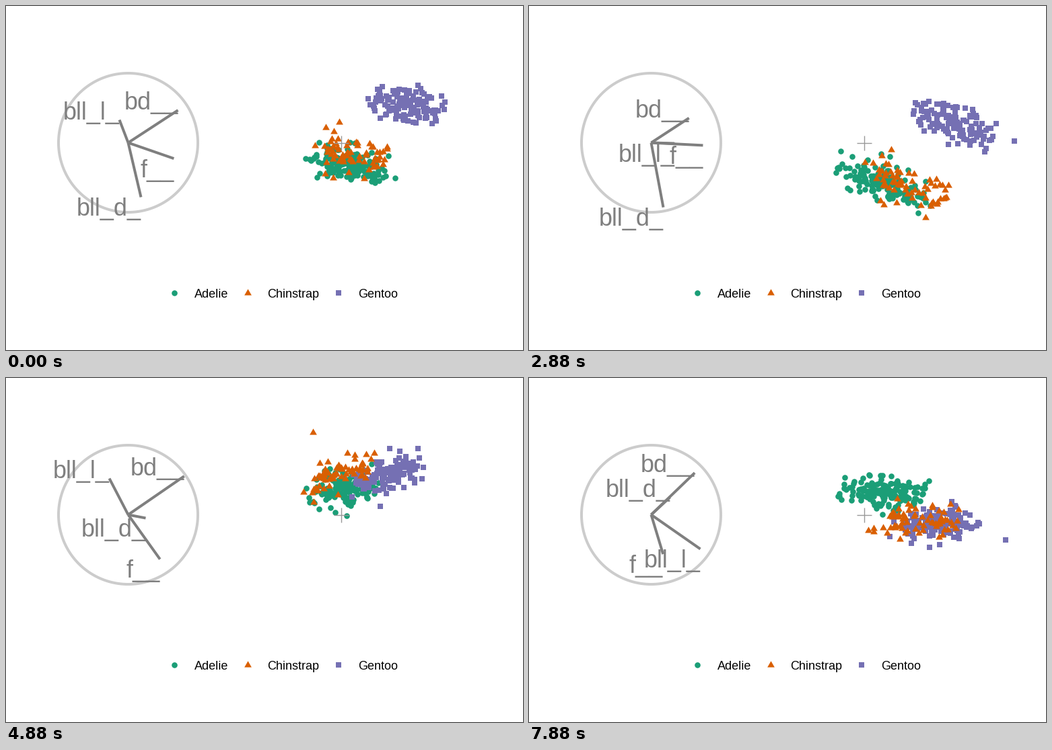
Write a matplotlib script that moves like this. It is 768x512 px and loops after 8000 ms.

```python
import numpy as np
import matplotlib.pyplot as plt
from matplotlib.animation import FuncAnimation

W, H, DPI = 768, 512, 100
PT = 72 / DPI                      # points per pixel
HUB, RADIUS = np.array([181, 203]), 103
ORIGIN, SCALE = np.array([423.5, 174]), 179
GREY, FONT = "#7f7f7f", "Liberation Sans"
FRAMES, INTERVAL = 64, 125

# Path of the tour: frame, tip of bill length, tip of bill depth (pixels from
# the hub), and the turn in degrees of the flipper and mass spokes
PATH = np.array([
    (8, -13, -34, 19, 81, 40),
    (17, 33, 1, 19, 99, 27),
    (22, 38, 5, 17, 99, 26),
    (29, 15, -23, 24, 79, 39),
    (39, -28, -54, 26, 5, 55),
    (47, -16, -22, 7, -33, 58.5),
    (55, 24, 19, 7, -45, 59.5),
    (63, 73, 51, 28, -26, 57),
])
LABELS = ["bll_l_", "bll_d_", "f__", "bd__"]

# Bill length, bill depth, flipper length, body mass
LOW = np.array([32.1, 13.1, 172, 2700])
SPAN = np.array([27.5, 8.4, 59, 3600])
STEP = np.array([0.1, 0.1, 1, 50])
SEX_GAP = np.array([3.7, 1.5, 6.5, 640])
SPREAD = np.array([2.2, 0.78, 5.5, 310])
SHARED = 0.35                      # part of the spread common to all measures
TRIANGLE = [(0, 1), (-0.866, -0.5), (0.866, -0.5)]

rng = np.random.default_rng(12)


def measure(count, mean, outlier=None):
    """Birds of two sexes around a mean, scaled to 0..1."""
    sex = np.where(np.arange(count) % 2, 0.5, -0.5)[:, None]
    size = rng.standard_normal((count, 1))
    own = rng.standard_normal((count, 4))
    noise = np.clip(np.sqrt(SHARED) * size + np.sqrt(1 - SHARED) * own, -2.3, 2.3)
    birds = np.array(mean) + sex * SEX_GAP + noise * SPREAD
    if outlier:
        birds[0] = outlier
    birds = np.round(birds / STEP) * STEP
    return np.clip((birds - LOW) / SPAN, 0, 1)


adelie = measure(151, (38.8, 18.35, 190, 3700))
gentoo = measure(123, (47.5, 14.98, 217.2, 5076), (59.6, 17, 230, 6050))
chinstrap = measure(68, (48.8, 18.42, 195.8, 3733), (58, 17.8, 181, 3700))

# name, data, marker, size in px, colour, key x, text x
GROUPS = [
    ("Adelie", adelie, "o", 8.6, "#1b9e77", 249, 279),
    ("Gentoo", gentoo, "s", 8, "#7570b3", 493, 522.5),
    ("Chinstrap", chinstrap, TRIANGLE, 12.4, "#d95f02", 358, 387.5),
]

fig = plt.figure(figsize=(W / DPI, H / DPI), dpi=DPI, facecolor="white")
ax = fig.add_axes([0, 0, 1, 1])
ax.set(xlim=(-0.5, W - 0.5), ylim=(H - 0.5, -0.5))
ax.axis("off")


def stroke(xs, ys, color, width, z):
    return ax.plot(xs, ys, color=color, lw=width * PT, solid_capstyle="butt", zorder=z)[0]


def text(x, y, label, size, color, ha):
    return ax.text(x, y, label, fontsize=size * PT, color=color, ha=ha,
                   va="baseline", family=FONT, zorder=4)


turn = np.linspace(0, 2 * np.pi, 181)
stroke(HUB[0] + 103.5 * np.cos(turn), HUB[1] + 103.5 * np.sin(turn), "#cccccc", 4, 1)
stroke([486, 508], [203, 203], "#999999", 1.4, 6)
stroke([497, 497], [192, 214], "#999999", 1.4, 6)

spokes = [stroke([], [], GREY, 4, 3) for _ in LABELS]
tags = [text(0, 0, label, 36, GREY, "right") for label in LABELS]

clouds = []
for z, (name, data, marker, size, color, key_x, text_x) in enumerate(GROUPS):
    style = dict(ls="none", marker=marker, ms=size * PT, color=color, mew=0)
    clouds.append(ax.plot([], [], zorder=5 + z / 10, **style)[0])
    ax.plot([key_x], [426], **style)
    text(text_x, 433.5, name, 18, "black", "left")


def basis_at(frame):
    """Two spokes from the path; the other two make the columns orthonormal."""
    *tips, angle = [np.interp(frame, PATH[:, 0], col) for col in PATH[:, 1:].T]
    bill = np.reshape(tips, (2, 2)) / RADIUS
    rest = np.eye(2) - bill.T @ bill
    det = np.sqrt(max(np.linalg.det(rest), 0))
    root = (rest + det * np.eye(2)) / np.sqrt(np.trace(rest) + 2 * det)
    c, s = np.cos(np.radians(angle)), np.sin(np.radians(angle))
    return np.vstack([bill, np.array([[c, s], [s, -c]]) @ root])


def draw(frame):
    basis = basis_at(frame)
    for spoke, tag, (x, y) in zip(spokes, tags, HUB + RADIUS * basis):
        spoke.set_data([HUB[0], x], [HUB[1], y])
        tag.set_position((x, y + 27.5 if y > HUB[1] else y - 1))
    for cloud, group in zip(clouds, GROUPS):
        cloud.set_data(*(ORIGIN + SCALE * group[1] @ basis).T)
    return spokes + tags + clouds


anim = FuncAnimation(fig, draw, frames=FRAMES, interval=INTERVAL, repeat=True,
                     repeat_delay=0, init_func=lambda: draw(0))
plt.show()
```
